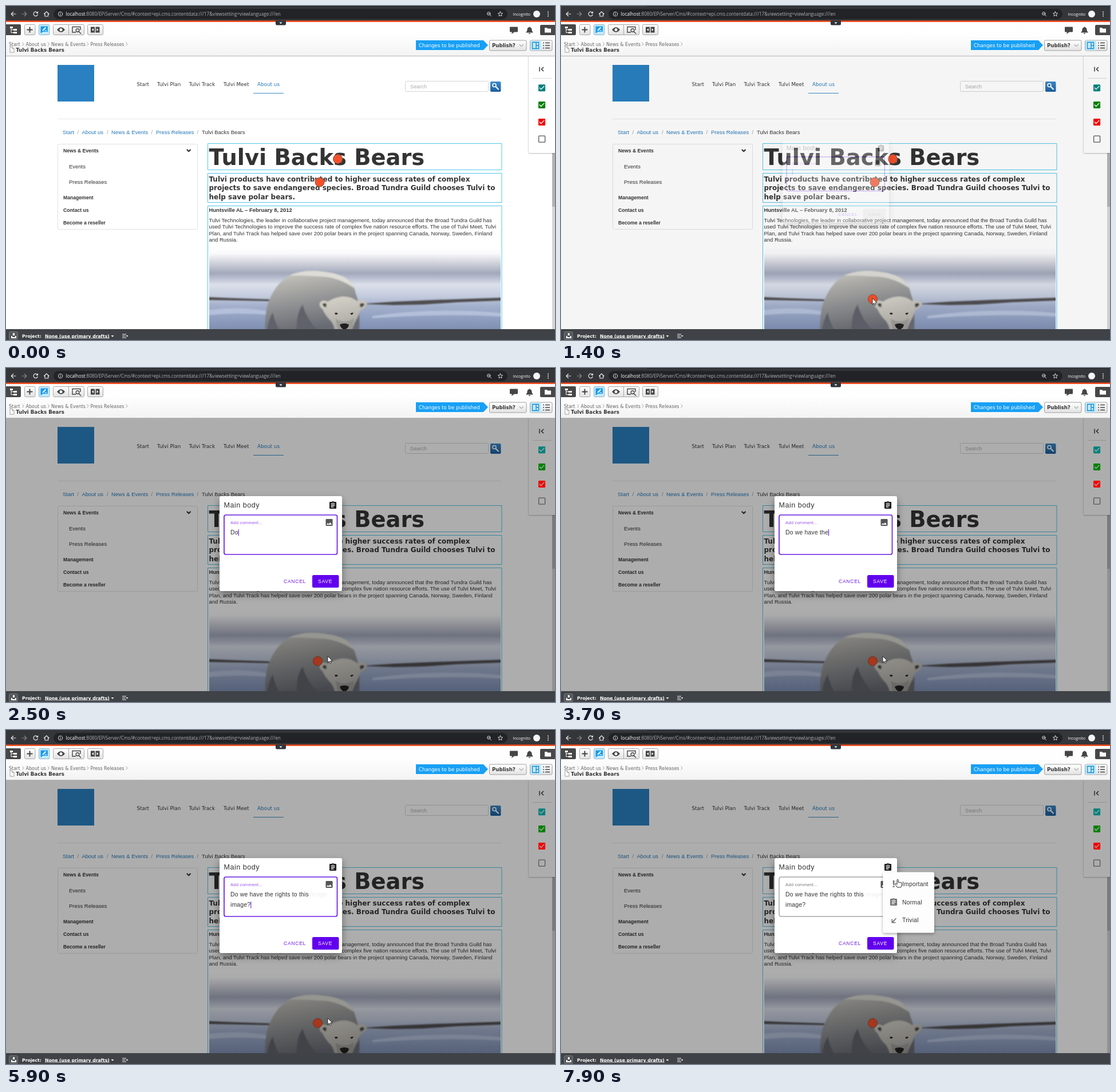
Recreate the animation shown at these times as an HTML page. Size 959x584 px, loop 8000 ms.

```html
<!DOCTYPE html>
<html lang="en">
<head>
<meta charset="utf-8">
<title>Page comments</title>
<style>
html, body { margin: 0; width: 100%; height: 100%; overflow: hidden; background: #fff; }
svg { display: block; width: 100vw; height: 100vh; }
text { white-space: pre; fill: #333; }
.u { font-family: "DejaVu Sans", sans-serif; }
.a { font-family: "Liberation Sans", sans-serif; }
.o { font-family: "Open Sans", sans-serif; }
.b { font-weight: bold; }
.link text, text.link { fill: #2479b8; }
.trail text { fill: #666; }
.body { font-size: 9.47px; }
.side { font-size: 8.65px; }
.form { font-size: 10.4px; letter-spacing: .2px; }
.btn { font-size: 8.6px; letter-spacing: .7px; }
.line { fill: none; stroke-linecap: round; stroke-linejoin: round; }
.edit { fill: none; stroke: #55c5ea; }
.mark { fill: #f4512a; stroke: #8c4a3a; }
</style>
</head>
<body>
<svg viewBox="0 0 959 584" preserveAspectRatio="none">
<defs>
  <linearGradient id="sky" x2="0" y2="1">
    <stop offset="0" stop-color="#fff"/><stop offset=".08" stop-color="#fafafc"/>
    <stop offset=".2" stop-color="#cfd1da"/><stop offset=".32" stop-color="#a3a9bb"/>
    <stop offset=".38" stop-color="#b9bfd0"/><stop offset=".46" stop-color="#dce0ea"/>
    <stop offset=".6" stop-color="#c3cbdd"/><stop offset=".72" stop-color="#a3b0cc"/><stop offset="1" stop-color="#7f90b4"/>
  </linearGradient>
  <linearGradient id="fur" x2=".25" y2="1">
    <stop offset="0" stop-color="#d3d2cb"/><stop offset=".25" stop-color="#b4b3ae"/>
    <stop offset=".6" stop-color="#8f9092"/><stop offset="1" stop-color="#686b73"/>
  </linearGradient>
  <linearGradient id="face" x2=".3" y2="1"><stop stop-color="#d9d6cc"/><stop offset="1" stop-color="#a9a7a2"/></linearGradient>
  <linearGradient id="find" x2="0" y2="1"><stop stop-color="#3f8ccb"/><stop offset="1" stop-color="#1b5f9f"/></linearGradient>
  <linearGradient id="key" x2="0" y2="1"><stop stop-color="#fff"/><stop offset="1" stop-color="#e2e2e2"/></linearGradient>
  <linearGradient id="tools" x2="0" y2="1"><stop stop-color="#fff"/><stop offset=".4" stop-color="#fefefe"/><stop offset="1" stop-color="#f3f3f3"/></linearGradient>
  <filter id="shadow" x="-20%" y="-20%" width="140%" height="150%"><feDropShadow dx="0" dy="6" stdDeviation="7" flood-opacity=".4"/></filter>
  <filter id="soft" x="-20%" y="-20%" width="140%" height="140%"><feDropShadow dx="0" dy="2" stdDeviation="2.5" flood-opacity=".35"/></filter>
  <filter id="thin" x="-20%" y="-20%" width="140%" height="140%"><feDropShadow dx="0" dy=".5" stdDeviation="1" flood-opacity=".4"/></filter>
  <filter id="blur"><feGaussianBlur stdDeviation="1"/></filter>
  <clipPath id="photo"><path d="M355 421h509v144H355z"/></clipPath>
  <path id="task" d="M19 3h-4.2a3 3 0 0 0-5.6 0H5a2 2 0 0 0-2 2v14a2 2 0 0 0 2 2h14a2 2 0 0 0 2-2V5a2 2 0 0 0-2-2zm-7 0a1 1 0 1 1 0 2 1 1 0 0 1 0-2zm2 14H7v-2h7zm3-4H7v-2h10zm0-4H7V7h10z"/>
  <path id="pic" d="M21 19V5a2 2 0 0 0-2-2H5a2 2 0 0 0-2 2v14a2 2 0 0 0 2 2h14a2 2 0 0 0 2-2zM8.5 13.5l2.5 3 3.5-4.5 4.5 6H5z"/>
  <path id="tick" d="M19 3H5a2 2 0 0 0-2 2v14a2 2 0 0 0 2 2h14a2 2 0 0 0 2-2V5a2 2 0 0 0-2-2zm-9 14l-5-5 1.4-1.4 3.6 3.6 7.6-7.6L19 8z"/>
</defs>
<path fill="#fff" d="M0 0h959v584H0z"/>

<!-- web page -->
<rect x="90" y="103" width="64" height="64" fill="#2a80c0"/>
<g class="u" font-size="8.8">
  <text x="228.5" y="139.5">Start</text><text x="264" y="139.5">Tulvi Plan</text>
  <text x="319.5" y="139.5">Tulvi Track</text><text x="380" y="139.5">Tulvi Meet</text>
  <text class="link" x="439" y="139.5">About us</text>
</g>
<path d="M432 152.5h53" stroke="#3d8cc4"/>
<path d="M90 197.5h775" stroke="#e8e8e8"/>
<rect x="697.5" y="131.5" width="145" height="18" rx="2" fill="#fff" stroke="#d4d4d4"/>
<text class="a" x="706" y="143.5" font-size="9.2" style="fill:#aaa">Search</text>
<rect x="846" y="132" width="18.5" height="18" rx="2" fill="url(#find)"/>
<g class="line" stroke="#fff" stroke-width="1.6"><circle cx="853" cy="138.5" r="3"/><path d="M855.5 141l4.500 4.500" stroke-width="2.2"/></g>
<g class="a body link">
  <text x="99" y="224">Start</text><text x="132.5" y="224">About us</text>
  <text x="184" y="224">News &amp; Events</text><text x="262" y="224">Press Releases</text>
  <g id="slashes"></g>
  <text x="342" y="224" style="fill:#333">Tulvi Backs Bears</text>
</g>
<rect x="90.5" y="241.5" width="244" height="149" rx="2" fill="none" stroke="#e2e2e2"/>
<g class="a b side">
  <text x="100" y="256">News &amp; Events</text><text x="100" y="338">Management</text>
  <text x="100" y="360">Contact us</text><text x="100" y="382">Become a reseller</text>
</g>
<g class="a body"><text x="110" y="284">Events</text><text x="110" y="310.5">Press Releases</text></g>
<path class="line" d="M316.5 251.5l2.700 2.700 2.700-2.700" stroke="#333" stroke-width="2.2"/>

<text class="u b" x="354.5" y="278" font-size="38.4">Tulvi Backs Bears</text>
<g class="u b" font-size="12">
  <text x="354.5" y="306.5">Tulvi products have contributed to higher success rates of complex</text>
  <text x="354.5" y="322.3">projects to save endangered species. Broad Tundra Guild chooses Tulvi to</text>
  <text x="354.5" y="338">help save polar bears.</text>
</g>
<g class="a body">
  <text class="b" x="354.5" y="360">Huntsville AL – February 8, 2012</text>
  <text x="354.5" y="377.5">Tulvi Technologies, the leader in collaborative project management, today announced that the Broad Tundra Guild has</text>
  <text x="354.5" y="389">used Tulvi Technologies to improve the success rate of complex five nation resource efforts. The use of Tulvi Meet, Tulvi</text>
  <text x="354.5" y="400.5">Plan, and Tulvi Track has helped save over 200 polar bears in the project spanning Canada, Norway, Sweden, Finland</text>
  <text x="354.5" y="412">and Russia.</text>
</g>
<g clip-path="url(#photo)">
  <path d="M355 421h509v144H355z" fill="url(#sky)"/>
  <g filter="url(#blur)">
    <path d="M350 509l50 2 60 2v3l-50-1-60-1zM618 521l60-4 70-3 60-2 60-2v5l-80 3-60 4-50 1z" fill="#4f4d50"/>
    <path d="M350 532q60-8 110 2v6q-60-5-110 1zM640 542q110-16 228-5v6q-110-6-228 3z" fill="#b4c0da"/>
    <path d="M453 570q-2-38 8-58 12-28 34-41 20-9 46-8 30 2 48 10 18 9 22 30 8 18 6 67z" fill="url(#fur)"/>
    <path d="M508 570q-2-30 10-48 8 28 30 48zM456 570q2-22 10-34 4 20 14 34z" fill="#5e626b"/>
    <path d="M495 471q20-9 46-8 30 2 48 10 14 7 19 20-30-20-60-20-30-2-53-2z" fill="#dddcd5"/>
    <path d="M548 520q4-8 14-3 12-8 27-9 15 0 24 8 13-5 17 3 1 8-11 13-4 12-10 22l-6 16h-28q-2-16-12-24-8-10-10-16-6-4-5-10z" fill="url(#face)"/>
    <path d="M553 521q3-3 7 0l-1 6q-6-2-6-6zM618 521q5-3 8 0-1 5-7 6z" fill="#45433f"/>
    <path d="M576 547q15 10 32-1l-4 24h-24z" fill="#9c9a95"/>
  </g>
  <path d="M574 537q4-2 6 1l-4 2zM601 538q4-3 6-1l-3 3zM583 557q8-4 16 0-1 7-8 9-6-2-8-9z" fill="#221f20"/>
</g>
<path class="edit" d="M352.5 240.5h513.500v46h-513.500zM352.5 292.5h513.500v51h-513.500zM352.5 565v-215.500h513.500v215.500"/>
<circle class="mark" cx="579.5" cy="267.5" r="8"/>
<circle class="mark" cx="548" cy="308" r="8"/>
<circle class="mark" id="mark" cx="544.5" cy="512.5" r="8"/>
<path d="M954 88h5v477h-5z" fill="#d6d6d6"/><path d="M954 88h5v263h-5z" fill="#b4b4b4"/>
<path d="M913 87h46v170h-46z" fill="#fff" filter="url(#thin)"/>
<path d="M920 126.5h33" stroke="#d8d8d8"/>
<path d="M932 106.5v8M939 107l-3.700 3.500 3.700 3.500" fill="none" stroke="#222" stroke-width="1.3"/>

<path id="scrim" d="M0 87h959v478H0z"/>
<use href="#tick" transform="translate(928 135.2) scale(.67)" fill="#00807c"/>
<use href="#tick" transform="translate(928 165) scale(.67)" fill="#008000"/>
<use href="#tick" transform="translate(928 195) scale(.67)" fill="#f00000"/>
<rect x="930.6" y="227.2" width="11" height="11" rx="1" fill="none" stroke="#555" stroke-width="1.3"/>

<!-- browser bar -->
<path fill="#35363a" d="M0 0h959v26H0z"/><path fill="#1f2023" d="M150 0h809v1H150z"/>
<rect x="83" y="5" width="793" height="18" rx="9" fill="#222327"/>
<g class="line" stroke="#e8e8e8" stroke-width="1.2">
  <path d="M17 14H9.500m3.200-3.500L9.200 14l3.500 3.500"/><path d="M28 14h7.500m-3.200-3.500l3.500 3.500-3.500 3.500" stroke="#85868a"/>
  <path d="M55 12a3.700 3.700 0 1 0 .3 3M55.500 10v2.300h-2.300"/><path d="M66.500 14l4.300-4 4.300 4M68 13.500v4.500h5.600v-4.500"/>
  <g stroke-width=".9"><circle cx="95" cy="14" r="3.7"/><path d="M95 13.500v2.300M95 12v.1"/>
  <circle cx="843.3" cy="13.3" r="2.7"/><path d="M845.5 15.5l2.200 2.200M842 13.300h2.600"/>
  <path d="M863.5 9.800l1.200 2.700 2.900.3-2.200 2 .6 2.900-2.500-1.500-2.500 1.500.6-2.900-2.200-2 2.900-.3z"/></g>
</g>
<text class="o" x="104.5" y="17" font-size="8.1" style="fill:#aeb1b5"><tspan fill="#fff">localhost</tspan>:8080/EPiServer/Cms/#context=epi.cms.contentdata:///17&amp;viewsetting=viewlanguage:///en</text>
<text class="o" x="885.5" y="16.5" font-size="7" style="fill:#fff">Incognito</text>
<circle cx="927" cy="14" r="6" fill="#f5f5f5"/>
<g fill="#eee"><circle cx="947" cy="10.5" r="1"/><circle cx="947" cy="14" r="1"/><circle cx="947" cy="17.5" r="1"/></g>

<!-- editor toolbar -->
<path fill="url(#tools)" d="M0 26h959v61H0z"/><path fill="#f84d1c" d="M0 25.500h959v2.500H0z"/><path d="M0 87.500h959" stroke="#b5b5b5"/>
<path fill="#30343c" d="M471 25.500h18v6q0 2-2 2h-14q-2 0-2-2z"/><path fill="#fff" d="M477.500 28.500h5l-2.500 2.700z"/>
<path fill="#474747" d="M0 32h24q2 0 2 2v15q0 2-2 2H0zM959 33h-24q-2 0-2 2v14q0 2 2 2h24z"/>
<path fill="#fff" d="M7 36h5v3H7zM13 40h6v3h-6zM13 45h6v3h-6zM941 38h4l1 1.500h6v7h-11z"/><path d="M9 39v7.500h4M9 41.500h4" fill="none" stroke="#fff"/>
<g fill="url(#key)" stroke="#a8a8a8"><rect x="32.5" y="32.5" width="18.5" height="18" rx="2"/><rect x="82.5" y="32.5" width="54" height="18" rx="2"/><rect x="142.5" y="32.5" width="27" height="18" rx="2"/><path d="M109.500 32.500v18"/></g>
<rect x="57.5" y="32.5" width="18.5" height="18" rx="2" fill="#c3e9fb" stroke="#8fb4c6"/>
<path d="M41.500 36.500v10M36.500 41.500h10" stroke="#444" stroke-width="2"/>
<path d="M60.500 35.500h12.500v9.500H64.500l-4 3z" fill="#169bea"/><path d="M64 43l5.500-5.500" stroke="#fff" stroke-width="2"/><path d="M67.500 43h4" stroke="#fff"/>
<path d="M89 41.500q7-8.500 14 0-7 8.500-14 0z" fill="#444"/><circle cx="96" cy="41.5" r="2.5" fill="#fff"/>
<g fill="none" stroke="#444" stroke-width="1.4"><path d="M122 46h-6v-9.500h14V42"/><circle cx="125" cy="42.5" r="2.8" fill="#fff"/><path d="M127 44.500l4 4"/></g>
<path d="M148 36.500h7v10h-7zM156.500 36.500h7v10h-7z" fill="#444"/><path d="M150 41.500l3-2.500v5zM161.500 41.500l-3-2.500v5z" fill="#fff"/>
<path d="M881 36.500h12q1 0 1 1v7q0 1-1 1h-5l-5 3.500 1-3.500h-3q-1 0-1-1v-7q0-1 1-1zM908 46.500q2.500-2 2.500-5 0-3.500 3-4.200 1-2 2 0 3 .7 3 4.200 0 3 2.500 5zM912.500 47.500h4q-2 3-4 0z" fill="#454545"/>
<g class="u trail" font-size="8">
  <text x="5" y="69.5">Start</text><text x="34.5" y="69.5">About us</text><text x="79" y="69.5">News &amp; Events</text><text x="147.5" y="69.5">Press Releases</text>
</g>
<path id="chevrons" fill="none" stroke="#888" stroke-width=".8"/>
<path d="M7 71.500h4l3 3v6.500h-7zM11 71.500v3h3" fill="#fff" stroke="#888" stroke-width=".8"/>
<text class="u b" x="17.2" y="80" font-size="8.63">Tulvi Backs Bears</text>
<path fill="#18a0f5" d="M716 60h118l8 8.500-8 8.500H716z"/>
<text class="u" x="721" y="72" font-size="8.6" style="fill:#fff">Changes to be published</text>
<g fill="url(#key)" stroke="#a0a0a0"><rect x="844.5" y="60" width="64.5" height="18" rx="2"/><rect x="915.5" y="60" width="38.5" height="18" rx="2"/></g>
<text class="u b" x="849" y="72" font-size="8.65">Publish?</text>
<path class="line" d="M897 67.500l3.200 3.200 3.200-3.200" stroke="#aaa" stroke-width="1.2"/>
<path fill="#c3e9fb" d="M916 60.500h19v17h-19z"/><path d="M919.500 63.500h11v11h-11zM926 63.500v11M926 69h4.500" fill="none" stroke="#168ccc" stroke-width="1.3"/>
<path d="M938 64.500h2M938 69h2M938 73.500h2M942 64.500h8M942 69h8M942 73.500h8" stroke="#444" stroke-width="1.7"/>

<!-- project bar -->
<path fill="#3f4246" d="M0 565h959v19H0z"/>
<rect x="5.5" y="569.5" width="15" height="14" rx="2" fill="#55585c" stroke="#777"/>
<path d="M9 577h2v2h5v-2h2v4H9zM12 572h3v4h-3z" fill="#fff"/>
<g class="u b" font-size="7.7"><text x="28" y="579.5" style="fill:#fff">Project:</text><text x="68" y="579.5" text-decoration="underline" style="fill:#fff">None (use primary drafts)</text></g>
<path d="M183.500 576h5l-2.500 2.700zM209.500 576h4l-2 2.500z" fill="#fff"/><path d="M203 574h7M203 577h5.500M203 580h7" stroke="#fff" stroke-width="1.2"/>

<!-- comment dialog -->
<g id="dialog">
  <rect x="373" y="224" width="214" height="166" rx="3" fill="#fff" filter="url(#shadow)"/>
  <text class="a" x="380.5" y="244" font-size="12.6" letter-spacing=".5">Main body</text>
  <use href="#task" transform="translate(563 232) scale(.67)" fill="#1d1d1d"/>
  <rect id="field" x="381" y="257" width="197.5" height="69" rx="3" fill="none"/>
  <text class="a" id="label" x="392" y="273" font-size="7.7" letter-spacing=".15">Add comment...</text>
  <use href="#pic" transform="translate(556.5 262) scale(.67)" fill="#555"/>
  <g class="a form">
    <text id="line1" x="392" y="291"></text><text id="line2" x="392" y="309"></text>
    <text id="ghost" x="531.8" y="291" style="fill:#eee">image</text>
  </g>
  <path id="caret" d="M0 0v11.500" stroke="#6200ee"/>
  <text class="a btn" x="485" y="376" style="fill:#6f1ff0">CANCEL</text>
  <rect id="save" x="535" y="362" width="46.5" height="22" rx="2.5"/>
  <text class="a btn" id="saveText" x="545" y="376">SAVE</text>
</g>
<g id="menu">
  <rect x="562.5" y="248.5" width="89.5" height="106" rx="2.5" fill="#fdfdfd" filter="url(#soft)"/>
  <g fill="#757575">
    <path d="M579.700 263h2.800l-.4 8h-2zM579.700 272.500h2.800v2.500h-2.800z"/>
    <use href="#task" transform="translate(573 293) scale(.67)"/>
    <path d="M586 329.500l-1-1-6 6v-4h-1.500v7h7v-1.500h-4z"/>
  </g>
  <g class="a form"><text x="596" y="273">Important</text><text x="596" y="305">Normal</text><text x="596" y="336">Trivial</text></g>
</g>
<path id="arrow" d="M0 0v11l2.600-2.400 1.700 3.800 1.800-.8-1.700-3.600H8z" fill="#fff" stroke="#111" stroke-width=".8"/>
<path id="hand" d="M-1 1q0-1.200 1.100-1.200T1.200 1v4q1-.8 2 0 1-.6 1.900.3 1.900-.3 1.900 1.200v3q0 2-1.300 4H-.8q-1-2.200-3.600-4.700-.8-1.200.3-1.700 1.200-.3 3.100 1.600z" fill="#fff" stroke="#111" stroke-width=".9"/>
</svg>
<script>
const LOOP = 8000, STEP = 100;
const MESSAGE = "Do we have the rights to this image";
const BREAK = "Do we have the rights to this".length;
const $ = id => document.getElementById(id);
const set = (id, attrs) => { for (const k in attrs) $(id).setAttribute(k, attrs[k]); };
const show = (id, on) => set(id, { visibility: on ? "visible" : "hidden" });
const clamp = v => Math.min(1, Math.max(0, v));
const easeOut = p => 1 - (1 - p) ** 3;
const smooth = p => p * p * (3 - 2 * p);

$("slashes").innerHTML = [124.5, 176, 253.5, 333.5].map(x => `<text x="${x}" y="224" style="fill:#999">/</text>`).join("");
set("chevrons", { d: [28.5, 73, 141.5, 209.5].map(x => `M${x} 63.5l2.5 3-2.5 3`).join("") });

// Pointer stops: time, x, y
const stops = [
  [100, 912, 82], [900, 541, 505], [1000, 544, 511], [1400, 544, 511], [1500, 552, 512], [1600, 562, 504],
  [6400, 562, 504], [6500, 562, 500], [6600, 562, 500], [7100, 579, 232.5], [7200, 579, 232.5],
  [7400, 572, 239.5], [7700, 572, 239.5], [7900, 588, 261.5]
];
function pointer(t) {
  const i = stops.findIndex(s => s[0] >= t);
  if (i < 1) return stops[0].slice(1);
  const [t0, x0, y0] = stops[i - 1], [t1, x1, y1] = stops[i];
  const p = smooth((t - t0) / (t1 - t0));
  return [x0 + (x1 - x0) * p, y0 + (y1 - y0) * p];
}

// Typing bursts: first time, last time, characters at the start and at the end
const bursts = [[2400, 2900, 1, 6], [3100, 3100, 8, 8], [3300, 3600, 9, 12], [3700, 4300, 14, 20],
  [4400, 4400, 22, 22], [4600, 5300, 23, 33], [5500, 5600, 34, 35]];
function typed(t) {
  const b = bursts.filter(b => b[0] <= t).pop();
  if (!b) return 0;
  const p = b[1] > b[0] ? clamp((t - b[0]) / (b[1] - b[0])) : 1;
  return Math.round(b[2] + (b[3] - b[2]) * p);
}

function grow(id, p, opacity, cx, cy) {
  const s = .8 + .2 * easeOut(p);
  show(id, opacity > 0);
  set(id, { opacity, transform: `translate(${cx} ${cy}) scale(${s}) translate(${-cx} ${-cy})` });
}

function caretOn(t) {
  if (t < 2400) return t < 1900;
  if (t < 5900) return true;
  return t < 7500 && Math.floor((t - 5900) / 500) % 2 === 0;
}

function draw(t) {
  const age = t - 1381, menuAge = t - 7410;
  set("scrim", { opacity: .32 * clamp(age / 150) });
  grow("dialog", clamp(age / 150), clamp(age / 75), 480, 307);
  grow("menu", clamp(menuAge / 120), clamp(menuAge / 30), 562, 248);
  show("mark", t >= 1000);

  const n = typed(t), wrapped = t >= 5900, focus = t < 7500;
  $("line1").textContent = MESSAGE.slice(0, wrapped ? BREAK : n);
  $("line2").textContent = wrapped ? "image?" : "";
  set("ghost", { opacity: wrapped ? 1 : 0 });
  const width = $(wrapped ? "line2" : "line1").getComputedTextLength();
  set("caret", { transform: `translate(${392.5 + width} ${wrapped ? 300 : 282})`, opacity: caretOn(t) ? 1 : 0 });
  set("field", { stroke: focus ? "#6a1be0" : "#777", "stroke-width": focus ? 1.7 : 1 });
  $("label").style.fill = focus ? "#9a50f2" : "#777";
  set("save", { fill: n ? "#6200ee" : "#e0e0e0" });
  $("saveText").style.fill = n ? "#fff" : "#9c9c9c";

  const [x, y] = pointer(t), overIcon = t > 6600 && y < 270;
  for (const id of ["arrow", "hand"]) set(id, { transform: `translate(${x} ${y})` });
  show("arrow", t >= 100 && !overIcon);
  show("hand", overIcon);
}

const start = performance.now();
function tick() {
  const t = (performance.now() - start) % LOOP;
  draw(Math.floor(t / STEP) * STEP);
  requestAnimationFrame(tick);
}
tick();
</script>
</body>
</html>
```
